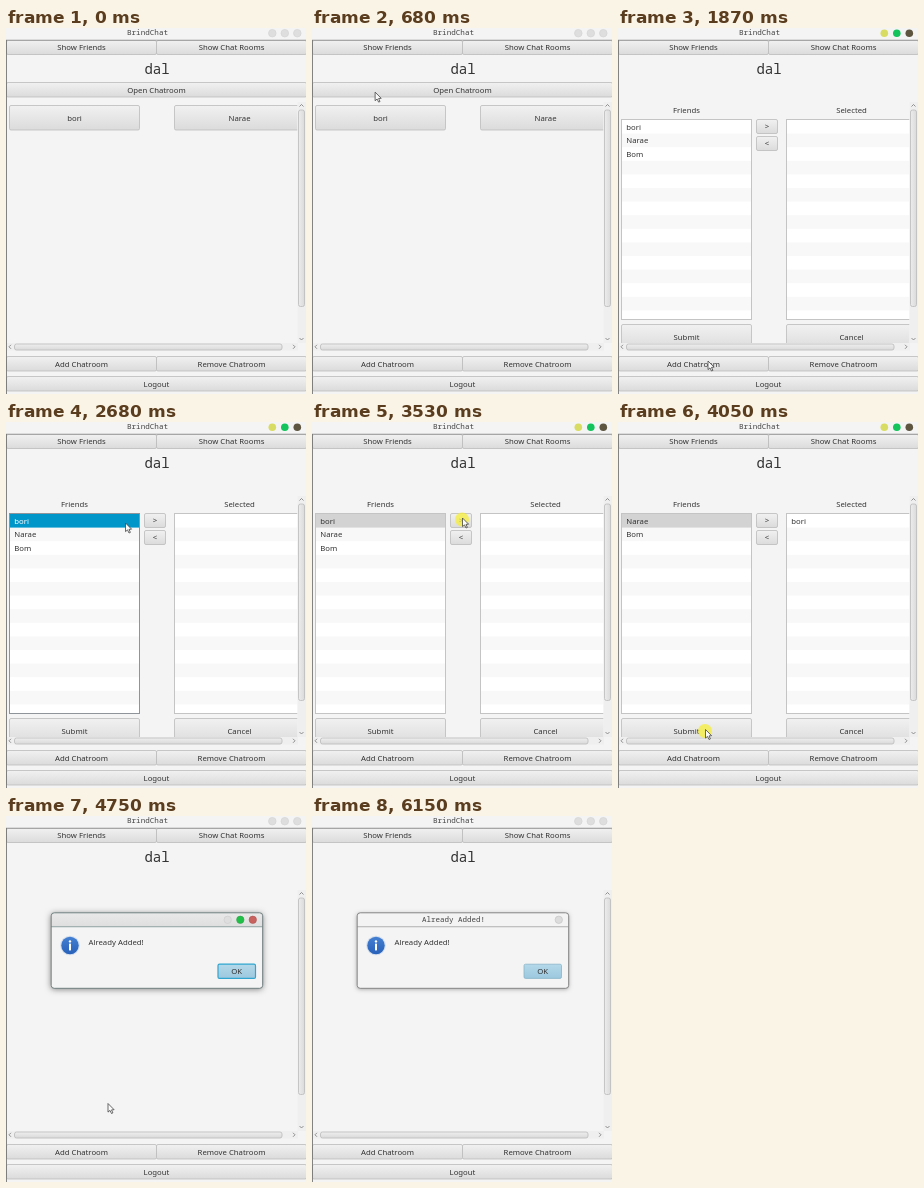
Recreate the animation shown at these times as an HTML page with a canvas. Size 300x366 px, loop 6190 ms.

```html
<!DOCTYPE html>
<html lang="en">
<head>
<meta charset="utf-8">
<title>Chat client</title>
<style>
html, body { margin: 0; width: 100%; height: 100%; overflow: hidden; background: #f4f4f4; }
canvas { display: block; width: 300px; height: 366px; }
</style>
</head>
<body>
<canvas id="stage"></canvas>
<script>
const LOOP = 6190;
const SANS = '"Noto Sans", "Open Sans", sans-serif';
const MONO = '"Noto Sans Mono", "DejaVu Sans Mono", monospace';
const canvas = document.getElementById('stage');
const ctx = canvas.getContext('2d');
const density = window.devicePixelRatio || 1;
canvas.width = 300 * density;
canvas.height = 366 * density;

// Moments at which the interface switches state, in ms
const WINDOW_ACTIVE = 1560, FRIENDS_OPEN = 1700, ROW_SELECTED = 2570,
  LIST_BLUR = 3220, FRIEND_MOVED = 3610, SUBMITTED = 4190,
  WINDOW_INACTIVE = 4300, DIALOG_OPEN = 4320, DIALOG_INACTIVE = 6150;

// Pointer stops: time, x, y
const pointerPath = [
  [120, 217, 351], [480, 25, 88], [620, 58, 59], [740, 68, 69],
  [1340, 97.5, 306], [1500, 90, 333], [2030, 90, 333],
  [2560, 118, 100], [2680, 119.5, 101], [2760, 119.5, 101],
  [3180, 150.5, 96], [3610, 150.5, 96], [4000, 87.5, 307.5],
  [4390, 87.5, 307.5], [4750, 102, 287.5], [5190, 243, 354], [5280, 246, 366]
];
const clicks = [[1540, 1690], [2540, 2650], [3240, 3620], [4010, 4170]];

const between = (t, from, to) => t >= from && t < to;
const clamp = v => Math.max(0, Math.min(1, v));
const ease = p => p * p * (3 - 2 * p);

function text(str, x, y, { size = 7.75, font = SANS, align = 'center', color = '#333' } = {}) {
  ctx.font = `${size}px ${font}`;
  ctx.textAlign = align;
  ctx.fillStyle = color;
  ctx.fillText(str, x, y);
}

function vertical(y, h, top, bottom) {
  const g = ctx.createLinearGradient(0, y, 0, y + h);
  g.addColorStop(0, top);
  g.addColorStop(1, bottom);
  return g;
}

function box(x, y, w, h, radius, fill, stroke, line = 1) {
  ctx.beginPath();
  ctx.roundRect(x, y, w, h, radius);
  ctx.fillStyle = fill;
  ctx.fill();
  if (!stroke) return;
  ctx.strokeStyle = stroke;
  ctx.lineWidth = line;
  ctx.stroke();
}

function dot(x, y, r, fill, stroke) {
  ctx.beginPath();
  ctx.arc(x, y, r, 0, Math.PI * 2);
  ctx.fillStyle = fill;
  ctx.fill();
  if (!stroke) return;
  ctx.strokeStyle = stroke;
  ctx.lineWidth = 0.6;
  ctx.stroke();
}

function button(label, x, y, w, h) {
  box(x, y, w, h, 1.5, vertical(y, h, '#f1f1f1', '#dbdbdb'), '#bcbcbc', 0.8);
  text(label, x + w / 2, y + h / 2 + 2.8);
}

function chevron(x, y, dx, dy) {
  ctx.beginPath();
  ctx.moveTo(x - dx - dy * 2, y - dy - dx * 2);
  ctx.lineTo(x + dx, y + dy);
  ctx.lineTo(x - dx + dy * 2, y - dy + dx * 2);
  ctx.strokeStyle = '#777';
  ctx.lineWidth = 0.8;
  ctx.stroke();
}

function scrollbars() {
  ctx.fillStyle = '#efefef';
  ctx.fillRect(291.5, 74, 8.5, 241);
  ctx.fillRect(1, 315, 291, 7.5);
  const across = ctx.createLinearGradient(292, 0, 299, 0);
  across.addColorStop(0, '#eeeeee');
  across.addColorStop(1, '#d9d9d9');
  box(292.5, 82, 6, 196.5, 2, across, '#bababa', 0.8);
  box(8.5, 316, 267.5, 6, 2, vertical(316, 6, '#eeeeee', '#d9d9d9'), '#bababa', 0.8);
  chevron(295.5, 77.5, 0, -1);
  chevron(295.5, 311, 0, 1);
  chevron(4, 318.8, -1, 0);
  chevron(288, 318.8, 1, 0);
}

function list(x, names, selected, focused) {
  const row = 13.6, top = 92;
  box(x, 91.5, 131, 200, 0, '#fff');
  for (let i = 1; i < 14; i += 2) {
    ctx.fillStyle = '#f8f8f8';
    ctx.fillRect(x, top + i * row, 131, row);
  }
  if (selected) {
    ctx.fillStyle = focused ? '#0096c9' : '#d3d3d3';
    ctx.fillRect(x, top, 131, row);
  }
  names.forEach((name, i) => text(name, x + 5.3, top + i * row + 9.6, {
    align: 'left', color: selected && focused && i === 0 ? '#fff' : '#333'
  }));
  ctx.strokeStyle = focused ? '#8e9499' : '#c4c4c4';
  ctx.lineWidth = 1;
  ctx.strokeRect(x + 0.5, 91.5, 130, 200);
}

function friendsPage(t) {
  const moved = t >= FRIEND_MOVED;
  const focused = between(t, ROW_SELECTED, LIST_BLUR);
  text('Friends', 68.5, 85);
  text('Selected', 233.5, 85);
  list(3, moved ? ['Narae', 'Bom'] : ['bori', 'Narae', 'Bom'], t >= ROW_SELECTED, focused);
  list(168, moved ? ['bori'] : [], false, false);
  button('>', 138.5, 91.5, 21, 14);
  button('<', 138.5, 108.5, 21, 14);
  button('Submit', 3.5, 296.5, 130, 26);
  button('Cancel', 168.5, 296.5, 130, 26);
}

function roomsPage() {
  button('bori', 3.5, 77.5, 130, 24.5);
  button('Narae', 168.5, 77.5, 130, 24.5);
}

function mainWindow(t) {
  ctx.fillStyle = '#f4f4f4';
  ctx.fillRect(0, 0, 300, 366);
  text('BrindChat', 141.5, 7.3, { size: 7.6, font: MONO, color: '#444' });
  const active = between(t, WINDOW_ACTIVE, WINDOW_INACTIVE);
  const colors = active ? ['#d9dc62', '#13c35c', '#5d5540'] : ['#dedede', '#dedede', '#dedede'];
  colors.forEach((c, i) => dot(266.3 + i * 12.5, 5.2, 3.8, c, active ? null : '#d2d2d2'));

  button('Show Friends', 0.5, 12.5, 150, 14);
  button('Show Chat Rooms', 150.5, 12.5, 150, 14);
  text('dal', 151, 46, { size: 14, font: MONO });
  if (t < FRIENDS_OPEN) button('Open Chatroom', 0.5, 54.5, 300, 14.5);

  ctx.save();
  ctx.beginPath();
  ctx.rect(0, 70, 291.5, 245);
  ctx.clip();
  if (t < FRIENDS_OPEN) roomsPage();
  else if (t < SUBMITTED) friendsPage(t);
  ctx.restore();
  scrollbars();

  button('Add Chatroom', 0.5, 328.5, 150, 14.5);
  button('Remove Chatroom', 150.5, 328.5, 150, 14.5);
  button('Logout', 0.5, 348.5, 300, 14.5);
  ctx.fillStyle = '#777';
  ctx.fillRect(0, 12, 0.9, 354);
  ctx.fillRect(0, 11.8, 300, 0.6);
}

function dialog(t) {
  const p = clamp((t - DIALOG_OPEN) / 200);
  const active = t < DIALOG_INACTIVE;
  ctx.save();
  ctx.globalAlpha = p;
  ctx.translate(151, 134.5);
  ctx.scale(0.945 + 0.055 * p, 0.945 + 0.055 * p);
  ctx.translate(-151, -134.5);

  ctx.save();
  ctx.shadowColor = active ? 'rgba(0,0,0,.5)' : 'rgba(0,0,0,.35)';
  ctx.shadowBlur = (active ? 6 : 4) * density;
  ctx.shadowOffsetY = density;
  box(45, 96.8, 211.5, 75.5, 3, '#f4f4f4');
  ctx.restore();
  box(45, 96.8, 211.5, 14, [3, 3, 0, 0],
    active ? vertical(97, 14, '#e9e9e9', '#dedede') : '#f3f3f3');
  ctx.fillStyle = active ? '#79908f' : '#a0a0a0';
  ctx.fillRect(45, 110.4, 211.5, 0.8);
  ctx.beginPath();
  ctx.roundRect(45.2, 96.8, 211.5, 75.5, 3);
  ctx.strokeStyle = active ? '#70807f' : '#858585';
  ctx.lineWidth = 1;
  ctx.stroke();

  if (active) {
    dot(221.7, 103.8, 3.7, '#dedede', '#cccccc');
    dot(234.3, 103.8, 3.7, '#1fc147', '#3a9a50');
    dot(246.8, 103.8, 3.7, '#c8625f', '#ae5553');
  } else {
    text('Already Added!', 141.5, 106, { size: 7.5, font: MONO, color: '#444' });
    dot(246.8, 103.8, 3.7, '#dcdcdc', '#c2c2c2');
  }

  dot(64, 129.5, 9.8, '#d5dfed');
  dot(64, 129.5, 8.7, vertical(120, 19, '#4581d3', '#2660b8'));
  dot(64, 125.4, 1.2, '#fff');
  box(63, 127.6, 2, 6.8, 0.4, '#fff');
  text('Already Added!', 82.5, 128.7, { align: 'left' });
  box(212, 148.2, 37.5, 14.2, 1.5, vertical(148, 14, '#b4d9ea', '#9dc8de'),
    active ? '#2fa5d0' : '#8ab5ca', active ? 1.2 : 0.8);
  text('OK', 230.7, 158.1);
  ctx.restore();
}

function pointerAt(t) {
  const next = pointerPath.findIndex(stop => stop[0] > t);
  if (next < 1) return null;
  const [t0, x0, y0] = pointerPath[next - 1];
  const [t1, x1, y1] = pointerPath[next];
  const p = ease((t - t0) / (t1 - t0));
  return [x0 + (x1 - x0) * p, y0 + (y1 - y0) * p];
}

function pointer(t) {
  const at = pointerAt(t);
  if (!at) return;
  const [x, y] = at;
  if (clicks.some(([from, to]) => between(t, from, to))) {
    dot(x - 0.5, y + 1.5, 7, 'rgba(246,238,50,.72)');
  }
  ctx.save();
  ctx.translate(x, y);
  ctx.beginPath();
  [[0, 0], [0, 8.6], [2, 6.9], [3.5, 10], [4.9, 9.4], [3.5, 6.4], [6.1, 6.2]]
    .forEach(([px, py]) => ctx.lineTo(px, py));
  ctx.closePath();
  ctx.fillStyle = '#fafafa';
  ctx.fill();
  ctx.strokeStyle = '#444';
  ctx.lineWidth = 0.8;
  ctx.stroke();
  ctx.restore();
}

function draw(now) {
  const t = now % LOOP;
  ctx.setTransform(density, 0, 0, density, 0, 0);
  mainWindow(t);
  if (t >= DIALOG_OPEN) dialog(t);
  pointer(t);
}

const start = performance.now();
function tick() {
  draw(performance.now() - start);
  requestAnimationFrame(tick);
}
tick();
</script>
</body>
</html>
```
